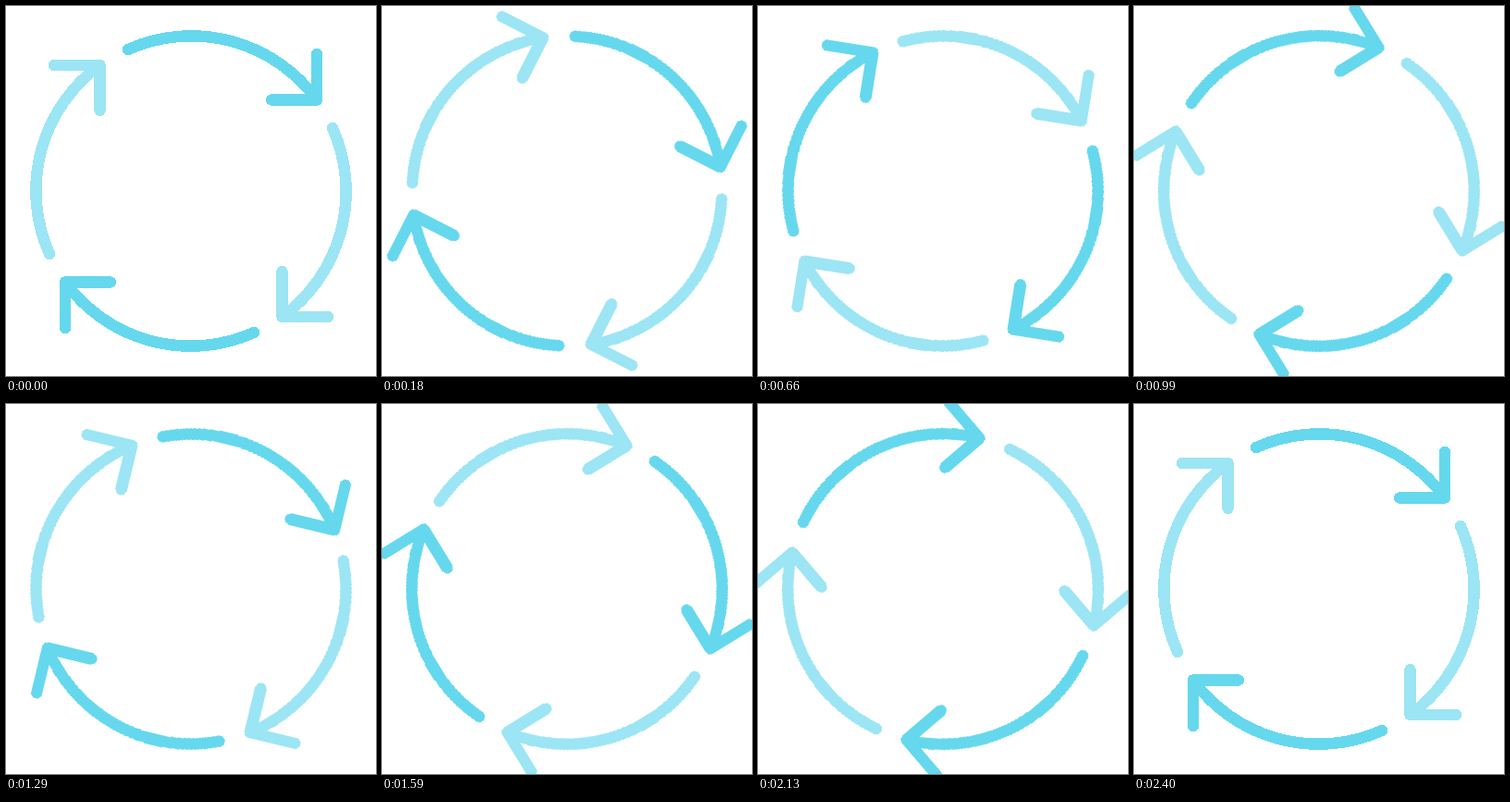
An HTML page that plays this animation: 400 px wide and 400 px high, repeating every 2430 ms.

```html
<!DOCTYPE html>
<html lang="en">
<head>
<meta charset="utf-8">
<title>Rotating arrows</title>
<style>
  html, body { margin: 0; width: 100%; height: 100%; overflow: hidden; background: #fff; }
  svg { display: block; width: 400px; height: 400px; }
  path { fill: none; stroke-width: 12.4; stroke-linecap: round; stroke-linejoin: round; }
  #ring {
    transform-origin: 0 0;
    shape-rendering: crispEdges;
    /* 81 held poses of 4.5deg; the last one equals the first */
    animation: spin 2430ms steps(81, end) infinite;
  }
  .dark { stroke: #65d8ee; }
  .light { stroke: #9ce5f4; }
  @keyframes spin {
    from { transform: rotate(0deg); }
    to { transform: rotate(364.5deg); }
  }
</style>
</head>
<body>
<svg viewBox="-200 -200 400 400">
  <defs>
    <path id="arrow" d="M-68 -153A167.5 167.5 0 0 1 136 -98.5M136 -148V-98.5H87"/>
  </defs>
  <g id="ring">
    <use href="#arrow" class="dark"/>
    <use href="#arrow" class="light" transform="rotate(90)"/>
    <use href="#arrow" class="dark" transform="rotate(180)"/>
    <use href="#arrow" class="light" transform="rotate(270)"/>
  </g>
</svg>
</body>
</html>
```
